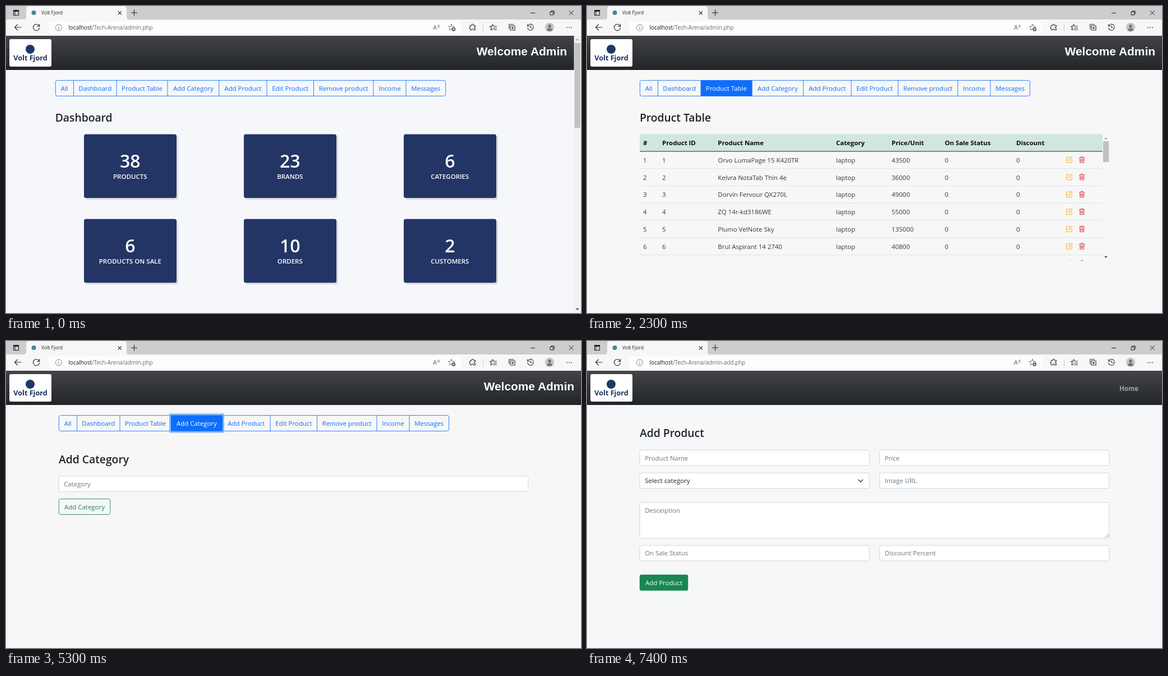
An HTML page for the animation above (8000 ms loop, 1025 by 547 pixels).

```html
<!DOCTYPE html>
<html lang="en">
<head>
<meta charset="utf-8">
<title>Admin panel</title>
<style>
html, body { margin: 0; width: 100%; height: 100%; overflow: hidden; background: #f7f7f7; }
svg { display: block; width: 1025px; height: 547px; font-family: "Open Sans", "Noto Sans", sans-serif; }
</style>
</head>
<body>
<svg id="stage" viewBox="0 0 1025 547" xmlns="http://www.w3.org/2000/svg"></svg>
<script>
const INK = '#212529', BLUE = '#0d6efd', GREEN = '#198754', GREY = '#6c757d';
const NAVY = '#233565', RED = '#dc3545', AMBER = '#fda722';
const LOOP = 8000;

const rect = (x, y, w, h, fill, extra = '') =>
  `<rect x="${x}" y="${y}" width="${w}" height="${h}" fill="${fill}" ${extra}/>`;
const text = (x, y, s, size = 11.45, fill = INK, weight = 400, anchor = 'start', extra = '') =>
  `<text x="${x}" y="${y}" font-size="${size}" fill="${fill}" font-weight="${weight}" text-anchor="${anchor}" ${extra}>${s}</text>`;
const line = (d, stroke = '#333', width = 1, extra = '') =>
  `<path d="${d}" fill="none" stroke="${stroke}" stroke-width="${width}" ${extra}/>`;
const circle = (x, y, r, fill, extra = '') =>
  `<circle cx="${x}" cy="${y}" r="${r}" fill="${fill}" ${extra}/>`;
const at = (x, y, body) => `<g transform="translate(${x} ${y})">${body}</g>`;
const heading = (x, y, s) => text(x, y, s, 19.3, INK, 600);

// Browser frame
const STAR = 'M0-5.5L1.6-1.9 5.5-1.5 2.6 1.1 3.4 5 0 3-3.4 5-2.6 1.1-5.5-1.5-1.6-1.9Z';

function toolbarIcons() {
  const round = 'stroke-linecap="round" stroke-linejoin="round"';
  return at(18, 12, line('M-4.5-4.5H4.5V4.5H-4.5Z', '#222', 1.1, round) + rect(-5, -5, 10, 3, '#222') + line('M-2-3V4', '#222', 1))
    + at(21, 38, line('M6 0H-5.5M-.5-5L-5.5 0-.5 5', '#333', 1.2, round))
    + at(54, 38, line('M5.4-1.6A5.6 5.6 0 1 0 5.6 1M5.5-5.5V-1.7H1.7', '#333', 1.2, round))
    + at(94, 38.5, circle(0, 0, 5.6, 'none', 'stroke="#777" stroke-width=".9"') + line('M0-.8V3M0-3V-2', '#777', 1.1))
    + text(761, 42.3, 'A', 11, '#666')
    + line('M769.5 34q1.5 2 0 4M771.3 33q2.2 3 0 6', '#666', .8)
    + at(794, 38, line(STAR, '#666', .9, round) + circle(3.8, 3.5, 3.5, '#666') + line('M2 3.5H5.6M3.8 1.7V5.3', '#fff', .8))
    + at(832, 38, line('M-4.5-3.5H-1.8C-2.5-6.5 2-6.5 1.4-3.5H4.5V-1C2-1.7 2 2.4 4.5 1.8V4.8H1.4C2 2.4-2.4 2.4-1.8 4.8H-4.5V1.8C-6.5 2-6.5-1-4.5-1Z', '#333', 1.1, round))
    + line('M850.5 32V45', '#ccc')
    + at(868, 38, line('M1.2-2L-.5-5.2-2.1-1.9-5.7-1.5-3-.8-3.8 4.8-.4 3M1.5-2H6.5M1 1.2H6.5M1 4.3H6.5', '#333', 1.1, round))
    + at(902, 38, line('M-3-2.8H5.2V5H-3ZM-5.2 2.5V-5.2H3M1.1-.8V3M-.8 1.1H3', '#333', 1.1, round))
    + at(935, 38, line('M-5-2.4A5.4 5.4 0 1 1-5.3 1M-5.3-5.3V-2H-2M0-3V.5H2.8', '#333', 1.1, round))
    + at(969, 38, circle(0, 0, 8.2, '#c9c6c4') + circle(0, -2, 2.9, '#777') + '<path d="M-5 5.2Q-5 1.5 0 1.5T5 5.2Q0 8.5-5 5.2Z" fill="#777"/>')
    + [1000, 1004, 1008].map(x => circle(x, 38.4, .9, '#333')).join('');
}

function browser() {
  return rect(0, 0, 1025, 24, '#cdcdcd')
    + rect(0, 24, 1025, 29, '#f7f7f7')
    + '<path d="M32 24Q36 24 36 20V5Q36 0 41 0H210Q215 0 215 5V20Q215 24 219 24Z" fill="#f7f7f7"/>'
    + rect(75, 27, 736, 23, '#fdfdfd', 'rx="4"')
    + circle(49.5, 12, 4, '#47889a')
    + text(63, 15.3, 'Volt Fjord', 8.6, '#222')
    + line('M199.8 9.3L205.8 15.3M205.8 9.3L199.8 15.3', '#222', 1.1)
    + line('M223 12H234M228.5 6.5V17.5', '#222', 1.1)
    + line('M935 12.5H943M1003.8 8.2L1011.6 16M1011.6 8.2L1003.8 16', '#222', 1)
    + line('M970 10.5H975.5V16H970ZM971.8 10V8.8H977.2V14.2H976', '#222', 1)
    + toolbarIcons();
}

const address = page =>
  text(111.5, 42, `localhost<tspan fill="#6c6c6c">/Tech-Arena/${page}</tspan>`, 9.9, '#1b1b1b');

function banner(width) {
  return rect(0, 53, width, 61, 'url(#dark)')
    + rect(6, 59, 75, 49, '#fff', 'rx="3"')
    + circle(43, 77, 8, '#1c3a63')
    + text(43.5, 97.4, 'Volt Fjord', 12.6, '#1c2f5c', 700, 'middle');
}

const welcome = right =>
  text(right, 88, 'Welcome Admin', 20.9, '#fff', 700, 'end', 'font-family="Liberation Sans, Arial, sans-serif"');

const page = (bg, width, file, body) =>
  rect(0, 53, 1025, 494, bg) + banner(width) + address(file) + body;

// Page parts
const TABS = ['All', 'Dashboard', 'Product Table', 'Add Category', 'Add Product',
  'Edit Product', 'Remove product', 'Income', 'Messages'];
const EDGES = [0, 32.5, 109, 200, 291.7, 377, 460.5, 567, 625, 695.5];

function nav(x, active = -1, focus = false) {
  let out = rect(x + .4, 132.6, 695.2, 27.8, 'none', `rx="3" stroke="${BLUE}" stroke-width=".85"`);
  TABS.forEach((name, i) => {
    const a = x + EDGES[i], b = x + EDGES[i + 1], on = i === active;
    if (i) out += line(`M${a} 132.5V160.5`, BLUE, .85);
    if (on) {
      if (focus) out += rect(a - 3, 129.2, b - a + 6.2, 34.3, '#86b6fb', 'rx="1"');
      out += rect(a, 132.2, b - a + .3, 28.5, BLUE);
    }
  });
  TABS.forEach((name, i) => {
    const mid = x + (EDGES[i] + EDGES[i + 1]) / 2;
    out += text(mid, 151, name, 11.45, i === active ? '#fff' : BLUE, 400, 'middle');
  });
  return out;
}

function scrollbar(x, top, bottom, y, h, track) {
  const c = x + 6;
  return rect(x, top, 12.5, bottom - top, track)
    + rect(x + 1, y, 10.3, h, '#c1c1c1')
    + `<path d="M${c - 3} ${top + 8.3}h6l-3-3.3z" fill="#a3a3a3"/>`
    + `<path d="M${c - 3} ${bottom - 8.3}h6l-3 3.3z" fill="#505050"/>`;
}

function card(i, count, label) {
  const x = 139 + i % 3 * 285, y = 228.5 + Math.floor(i / 3) * 151, mid = x + 82.3;
  return rect(x + 3, y + 3, 165, 113.5, '#d9dadf', 'rx="3.5"')
    + rect(x, y, 165, 113.5, NAVY, 'rx="3.5"')
    + text(mid, y + 59, count, 32, '#fff', 600, 'middle')
    + text(mid, y + 79, label, 11.5, '#fff', 600, 'middle');
}

const CARDS = [[38, 'PRODUCTS'], [23, 'BRANDS'], [6, 'CATEGORIES'],
  [6, 'PRODUCTS ON SALE'], [10, 'ORDERS'], [2, 'CUSTOMERS']];

const dashboard = () => page('#f5f7fb', 1013, 'admin.php',
  welcome(1000) + nav(88) + heading(87.7, 205.6, 'Dashboard')
  + CARDS.map((c, i) => card(i, ...c)).join('')
  + scrollbar(1012.5, 53, 547, 66, 151, '#f1f1f1'));

const COLS = [100, 134, 233.3, 444, 543, 637.7, 765.3];
const HEADS = ['#', 'Product ID', 'Product Name', 'Category', 'Price/Unit', 'On Sale Status', 'Discount'];
const ITEMS = [['Orvo LumaPage 15 K420TR', 43500], ['Kelvra NotaTab Thin 4e', 36000],
  ['Dorvin Fervour QX270L', 49000], ['ZQ 14r-kd3186WE', 55000],
  ['Plumo VelNote Sky', 135000], ['Brul Aspirant 14 2740', 40800]];
const ROW = 30.8;

const pencil = line('M1.5-4.6H-4A1 1 0 0 0-5-3.6V4.2A1 1 0 0 0-4 5.2H3.8A1 1 0 0 0 4.8 4.2V-.8', AMBER, 1)
  + line('M-1.4 1.7L-.8-.5 4.4-5.6 5.8-4.2.7.9Z', AMBER, .95, 'stroke-linejoin="round"');
const bin = line('M-5-3.8H5M-1.6-4V-5.3H1.6V-4M-3.8-3.6L-3.4 5.2H3.4L3.8-3.6M-1.8-1.7V3.4M0-1.7V3.4M1.8-1.7V3.4', RED, .95);

function table() {
  let out = rect(94, 228.3, 825, 30.7, '#d1e7dd') + line('M94 259H919', '#222', 1);
  HEADS.forEach((h, i) => out += text(COLS[i], 248, h, 11.4, '#0a0a0a', 700));
  ITEMS.forEach(([name, price], r) => {
    const y = 278.7 + r * ROW;
    [r + 1, r + 1, name, 'laptop', price, 0, 0].forEach((v, i) =>
      out += text(COLS[i], y, v, 11.45, '#34383c'));
    out += line(`M94 ${289.6 + r * ROW}H919`, '#dee2e6', .9);
  });
  for (let r = 0; r <= ITEMS.length; r++) {
    const y = 274 + r * ROW;
    out += at(859.5, y, pencil) + at(882.3, y, bin);
  }
  return `<g clip-path="url(#box)">${out}</g>`;
}

const products = () => page('#f7f7f7', 1025, 'admin.php',
  welcome(1013) + nav(94, 2) + heading(94, 205.6, 'Product Table') + table()
  + scrollbar(919, 229, 454, 241, 37, '#f7f7f7'));

function field(x, y, w, label, h = 28.3, color = GREY) {
  return rect(x + .4, y + .4, w - .8, h - .8, '#fff', 'rx="3" stroke="#ced4da" stroke-width=".9"')
    + text(x + 9.5, y + 18.5, label, 11.45, color);
}

const category = () => page('#f7f7f7', 1025, 'admin.php',
  welcome(1013) + nav(94, 3, true) + heading(94, 217.8, 'Add Category')
  + field(93.7, 240.3, 837.5, 'Category')
  + rect(94.2, 281.4, 91.6, 27.8, 'none', `rx="3" stroke="${GREEN}" stroke-width=".9"`)
  + text(140, 299.8, 'Add Category', 11.45, GREEN, 400, 'middle'));

const addProduct = () => page('#f6f7f9', 1025, 'admin-add.php',
  text(983, 88.7, 'Home', 11.5, '#a3a4a6', 700, 'end')
  + heading(94, 171, 'Add Product')
  + field(93.7, 194, 410, 'Product Name') + field(521.3, 194, 410, 'Price')
  + field(93.7, 234.7, 410, 'Select category', 28.3, INK) + field(521.3, 234.7, 410, 'Image URL')
  + line('M484 247.2L487.8 251 491.6 247.2', '#343a40', 1.3, 'stroke-linecap="round" stroke-linejoin="round"')
  + field(93.7, 287.3, 837.5, 'Desceiption', 64.5)
  + line('M923.5 350.2L930 343.7M927 350.2L930 347.2', '#777', .8)
  + field(93.7, 363.9, 410, 'On Sale Status') + field(521.3, 363.9, 410, 'Discount Percent')
  + rect(93.8, 416.3, 86.4, 28.5, GREEN, 'rx="3"')
  + text(137, 435, 'Add Product', 11.45, '#fff', 400, 'middle'));

const SCENES = [[0, dashboard], [500, products], [3500, category], [6500, addProduct]];

const stage = document.getElementById('stage');
stage.innerHTML = '<defs><linearGradient id="dark" x1="0" y1="0" x2="0" y2="1">'
  + '<stop offset="0" stop-color="#434448"/><stop offset="1" stop-color="#212428"/></linearGradient>'
  + '<clipPath id="box"><rect x="94" y="228" width="825" height="226"/></clipPath></defs>'
  + browser()
  + SCENES.map(([, draw]) => `<g class="scene" display="none">${draw()}</g>`).join('');

const groups = stage.querySelectorAll('.scene');
let shown = -1;

function update(ms) {
  const t = ms % LOOP;
  const now = SCENES.reduce((last, [start], i) => t >= start ? i : last, 0);
  if (now === shown) return;
  groups.forEach((g, i) => g.setAttribute('display', i === now ? 'inline' : 'none'));
  shown = now;
}

const began = performance.now();
function tick() {
  update(performance.now() - began);
  requestAnimationFrame(tick);
}
tick();
</script>
</body>
</html>
```
